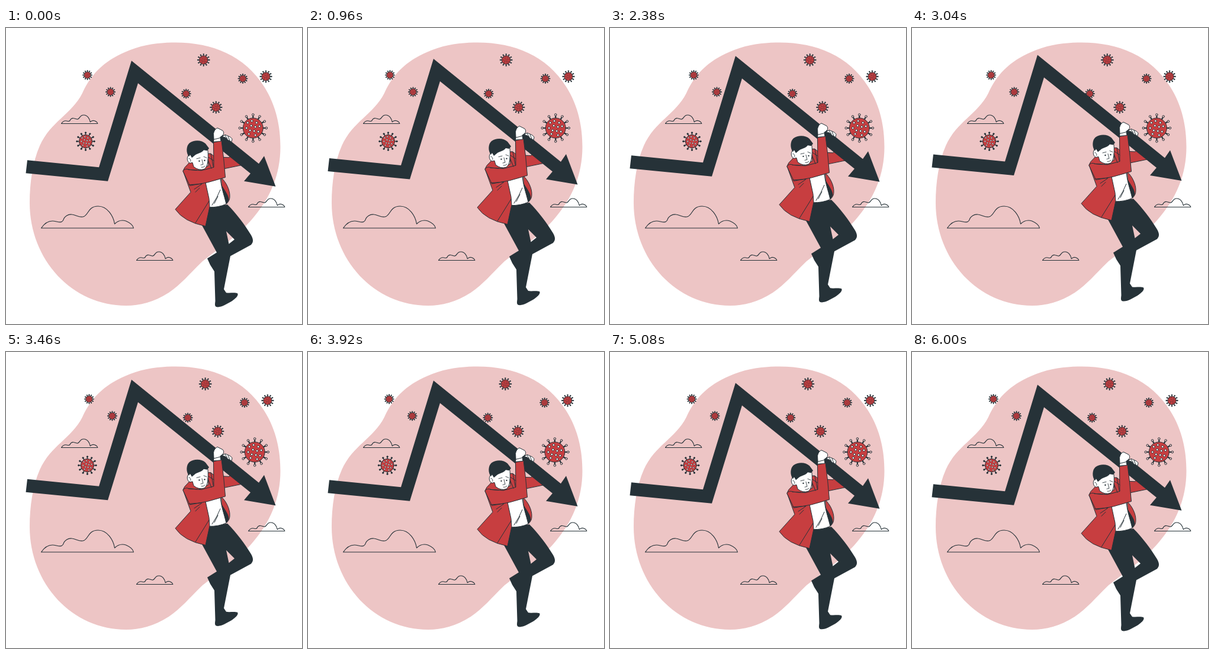
Recreate the animation shown at these times as an HTML page with a canvas. Size 500 by 500 pixels, loop 6.04 s.

```html
<!DOCTYPE html>
<html lang="en">
<head>
<meta charset="utf-8">
<title>Falling chart</title>
<style>
html, body { margin: 0; width: 100%; height: 100%; overflow: hidden; background: #fff; }
canvas { display: block; width: 500px; height: 500px; }
</style>
</head>
<body>
<canvas id="stage" width="500" height="500"></canvas>
<script>
const ctx = document.getElementById('stage').getContext('2d');
const DARK = '#263238', RED = '#c73e40', PINK = '#edc5c5', WHITE = '#fff';
const LOOP = 6040, CYCLE = 6000, LIFT = 10;

const path = d => new Path2D(d);

const blob = path('M280 24.5C345 23 402 45 436 99C457 132 463.500 168 463.500 201C463.500 247 447 288 413 326C390 352 356 375 332 394C310 415 296 433 275 447C250 463 226 469 203 469C112 469 40 392 40 295C40 262 45 226 57 199C76 157 110 147 129 110C145 74 171 52 210 37C233 28 258 25 280 24.5Z');

// Unit cloud, 156 wide, baseline at y = 0
const cloud = path('M0 0C4 -6 10 -12 19 -12C26 -12 33 -7 37 -13C39 -20 46 -24 52 -23C59 -22 64 -18 70 -19C80 -20 78 -37 96 -37C112 -37 122 -20 124 -7C130 -13 137 -14 143 -12C150 -9 155 -5 156 0Z');
const clouds = [[59.5, 338, 1], [93.500, 161.5, .393], [220.500, 392.5, .393], [409.500, 302.5, .393]];

const arrow = path('M36 223L157 235L212 55L427 229L436 216L455.500 267.500L402 258.500L413 245.500L223 93L172 258.500L33.500 245Z');

// x, y, scale
const viruses = [
  [417.300, 169, 1], [134.500, 191.5, .65], [333.700, 54, .43], [439, 82, .42], [354.800, 134, .42],
  [137.500, 79.5, .33], [176.500, 108, .33], [304.200, 111, .33], [400, 85.5, .33]
];
const dots = [[-9, -9], [-2, -12], [6, -9], [11, -3], [-3, -4], [4, -2], [-11, 0], [-5, 4], [2, 5], [9, 6], [-7, 10], [4, 12]];

// Fill, outline flag, shape
const backArm = [RED, 1, path('M338 212L346 212L353 217.500L377 218.500L380 214L400 231L371 237L349 241Z')];

const man = [
  // trousers and shoe
  [DARK, 0, path('M343 302L374 298C389 313 404 333 413 348C418 356 418.500 361 414 366L379 385L368 441L372 447C379 448 386 446 391 448C394 452 385 459 380 462C372 466 364 472 356 471C352 470 353 466 353.500 461L352 411L345 400L340 389L356 379L331 333ZM372 343L376.500 364.500L386 357Z')],
  // back flap of the jacket, lining, shirt
  [RED, 1, path('M364 253C372 260 378.500 274 378 284C378 290 376 293 373 296L365 280Z')],
  [DARK, 0, path('M363 262C367 272 376 280 376.500 290L373 297L369 293Z')],
  [WHITE, 1, path('M335 258L362 252C363 268 368 280 372 297Q359 303 343 302.500Z')],
  // jacket front
  [RED, 1, path('M313 223L307 230Q301 235 299 241L312 277L286 306Q300 327 337 334.500L344 302L343 288L336 256L351 238L346 212L340 212L342 232L327 240Z')],
  // raised sleeve
  [RED, 1, path('M299 241Q303 236 309 239L330 240.500L351 235L350.500 193L364 190Q368 219 370.500 252Q341 262 311 266Z')],
  // neck and head
  [WHITE, 1, path('M309 214C305 217 305 226 311 228L315 227L317 234Q325 241 335 238C341 234 342 222 341 206L334 200L316 204Z')],
  [DARK, 0, path('M309 217C304 211 304 199 310 194C318 188 331 189 337 195L343 203L340 207L334 206C330 211 325 211 320 214L314 219L311 214Z')],
  // front hand and cuff
  [WHITE, 1, path('M351 187L350.500 178Q352 171 357 168.500L366 173Q369.500 177 366 181L362 184L363 191L351 192Z')],
  // far hand
  [WHITE, 1, path('M365 183L370 180L375 182L379 184L382 187L381 192L375 189L371 185Z')]
];

const folds = path('M309 264.500L331 263M308 239L323 240M343 292L320 329M318 272L330 264M320 277L327 270' +
  'M362 273Q357 286 348 299M358 284L352 296M342 218L351 224M341 222L347 237' +
  'M351 188L363 185M370 181L374 187M375 183L378 190');
const features = path('M322 220.500L328 219M334 217L339 219M331 222L333 230L329 231M330 235Q333 236 336 233M309 220Q312 220 312 225');

function paint(shape, fill, line) {
  ctx.fillStyle = fill;
  ctx.fill(shape, 'evenodd');
  if (line) ctx.stroke(shape);
}

function disc(x, y, r, fill, line = true) {
  ctx.beginPath();
  ctx.arc(x, y, r, 0, 7);
  ctx.fillStyle = fill;
  ctx.fill();
  if (line) ctx.stroke();
}

function drawVirus(x, y, s) {
  ctx.save();
  ctx.translate(x, y);
  const spikes = 12;
  for (let i = 0; i < spikes; i++) {
    const a = i * 2 * Math.PI / spikes + Math.PI / 2;
    const c = Math.cos(a), n = Math.sin(a);
    ctx.lineWidth = Math.max(1.3, 2.2 * s);
    ctx.beginPath();
    ctx.moveTo(c * 15 * s, n * 15 * s);
    ctx.lineTo(c * 22 * s, n * 22 * s);
    ctx.stroke();
    ctx.lineWidth = 1;
    disc(c * 22.5 * s, n * 22.5 * s, 1.8 * s, s > .9 ? PINK : DARK);
  }
  disc(0, 0, 17 * s, RED);
  ctx.lineWidth = .85 * s;
  for (const [dx, dy] of dots) disc(dx * s, dy * s, 1.8 * s, s > .6 ? WHITE : RED);
  ctx.restore();
}

// Sideways shake, one value per tenth of the cycle
const shakeKeys = [0, -1, 2, -4, 4, -4, 4, -4, 2, -1, 0];
function shake(p) {
  const i = Math.min(9, Math.floor(p * 10)), u = p * 10 - i;
  return shakeKeys[i] + (shakeKeys[i + 1] - shakeKeys[i]) * u * u * (3 - 2 * u);
}

const lift = p => -LIFT * (1 - Math.abs(1 - 2 * p));

function draw(now) {
  const p = Math.min(1, now % LOOP / CYCLE);
  ctx.fillStyle = WHITE;
  ctx.fillRect(0, 0, 500, 500);
  ctx.strokeStyle = DARK;
  ctx.lineJoin = ctx.lineCap = 'round';
  paint(blob, PINK);

  for (const [x, y, s] of clouds) {
    ctx.save();
    ctx.translate(x, y);
    ctx.scale(s, s);
    ctx.lineWidth = 1.15 / s;
    ctx.stroke(cloud);
    ctx.restore();
  }

  const dx = shake(p);
  for (const [x, y, s] of viruses) drawVirus(x + dx, y, s);

  ctx.save();
  ctx.translate(0, .3 + lift(p));
  ctx.lineWidth = 1;
  paint(backArm[2], backArm[0], backArm[1]);
  paint(arrow, DARK);
  for (const [fill, line, shape] of man) paint(shape, fill, line);
  ctx.stroke(folds);
  ctx.lineWidth = .85;
  ctx.stroke(features);
  disc(326.5, 224.5, 1.2, DARK, false);
  disc(335.5, 223.5, 1.2, DARK, false);
  ctx.restore();
}

const start = performance.now();
function tick() {
  draw(performance.now() - start);
  requestAnimationFrame(tick);
}
tick();
</script>
</body>
</html>
```
